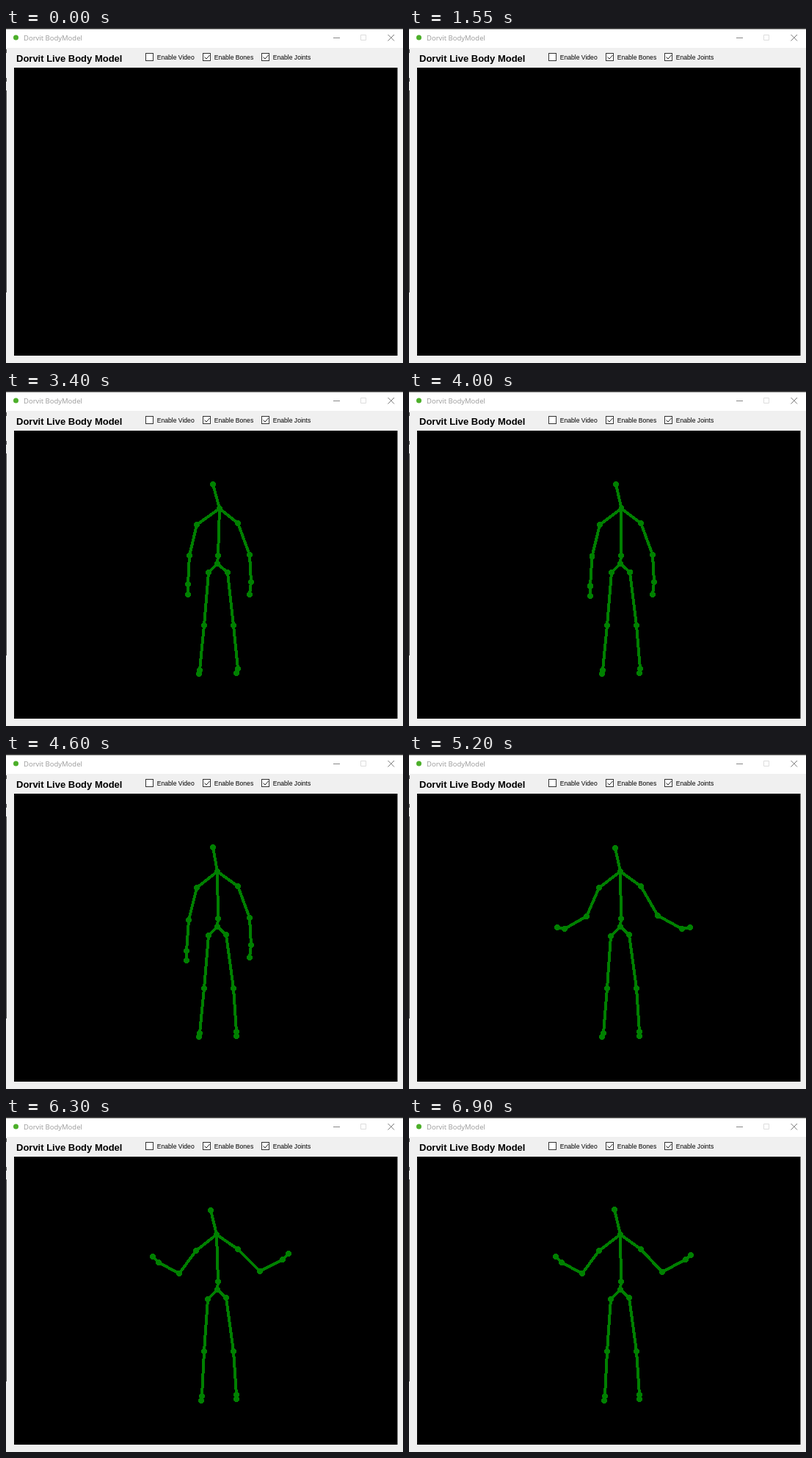
An HTML page for the animation above (6950 ms loop, 541 by 456 pixels).

```html
<!DOCTYPE html>
<html lang="en">
<head>
<meta charset="utf-8">
<title>Dorvit BodyModel</title>
<style>
  html, body { margin: 0; width: 100%; height: 100%; overflow: hidden; background: #f0f0f0; }
  svg { display: block; width: 541px; height: 456px; }
  .title { font: 9.5px "Open Sans", sans-serif; fill: #999; }
  .heading { font: bold 13px "Liberation Sans", Arial, sans-serif; }
  .label { font: 8.6px "Liberation Sans", Arial, sans-serif; }
  .box { fill: #fff; stroke: #333; }
  .line { fill: none; stroke: #222; }
  #body { fill: #008000; stroke: none; shape-rendering: crispEdges; }
  #body path { fill: none; stroke: #008000; stroke-width: 4; }
</style>
</head>
<body>
<svg viewBox="0 0 541 456">
  <rect width="541" height="456" fill="#f0f0f0"/>
  <rect width="541" height="27" fill="#fff"/>
  <rect width="541" height="1.5" fill="#2b2b2b"/>
  <path d="M.5 29v5M.5 68v5M.5 85V360" stroke="#555"/>
  <circle cx="13.5" cy="13" r="3.5" fill="#4caf2a"/>
  <text class="title" x="24" y="17">Dorvit BodyModel</text>
  <path class="line" d="M446 13.5h9" style="stroke:#888"/>
  <path class="line" d="M483.500 9.500h7v7h-7z" style="stroke:#ddd"/>
  <path class="line" d="M520.500 9l8.500 8.500M529 9l-8.500 8.500" style="stroke:#777"/>
  <text class="heading" x="14" y="45.500">Dorvit Live Body Model</text>
  <g id="options"></g>
  <rect x="11" y="54" width="522.500" height="392"/>
  <g id="body"></g>
</svg>
<script>
const LOOP = 6950, STEP = 50, APPEARS = 2500;

document.getElementById("options").innerHTML = [
  ["Enable Video", 190, false],
  ["Enable Bones", 268, true],
  ["Enable Joints", 348, true]
].map(([label, x, checked]) =>
  `<rect class="box" x="${x + .5}" y="34.500" width="10" height="10"/>` +
  (checked ? `<path class="line" d="M${x + 2.5} 39.500l2.500 2.500l4.500-5"/>` : "") +
  `<text class="label" x="${x + 15.7}" y="43.300">${label}</text>`
).join("");

const chains = [
  ["head", "neck", "spine", "hip"],
  ["neck", "shoulderL", "elbowL", "wristL", "handL"],
  ["neck", "shoulderR", "elbowR", "wristR", "handR"],
  ["hip", "hipL", "kneeL", "ankleL", "footL"],
  ["hip", "hipR", "kneeR", "ankleR", "footR"]
];

const entering = {
  head: [279, 130], neck: [283, 160], spine: [284, 223], hip: [285, 234],
  shoulderL: [254, 179], elbowL: [240, 223], wristL: [235, 263], handL: [236, 277],
  shoulderR: [310, 180], elbowR: [327, 223], wristR: [326, 258], handR: [325, 274],
  hipL: [272, 246], kneeL: [266, 316], ankleL: [266, 377], footL: [265, 383],
  hipR: [297, 246], kneeR: [307, 318], ankleR: [313, 376], footR: [312, 383]
};
const standing = {
  head: [282, 127], neck: [288, 160], spine: [289, 224], hip: [288, 235],
  shoulderL: [260, 182], elbowL: [249, 226], wristL: [246, 268], handL: [246, 281],
  shoulderR: [316, 180], elbowR: [332, 223], wristR: [334, 260], handR: [332, 277],
  hipL: [276, 247], kneeL: [270, 319], ankleL: [264, 380], footL: [263, 385],
  hipR: [300, 246], kneeR: [310, 319], ankleR: [314, 378], footR: [314, 384]
};
const leaning = {
  ...standing, neck: [291, 160], elbowL: [250, 224], wristL: [248, 263],
  handL: [248, 277], hipR: [302, 247], ankleR: [316, 378]
};
const lifting = {
  ...standing, head: [281, 128], shoulderL: [259, 182],
  elbowL: [242, 221], wristL: [212, 238], handL: [202, 236],
  elbowR: [339, 220], wristR: [372, 238], handR: [383, 236],
  hipL: [275, 248], ankleL: [265, 380]
};
const raised = {
  ...lifting, head: [279, 127], neck: [287, 160],
  elbowL: [236, 213], wristL: [208, 198], handL: [200, 190],
  elbowR: [346, 210], wristR: [377, 194], handR: [385, 186],
  ankleL: [267, 380], footL: [266, 386]
};
const reaching = {
  ...raised, wristL: [206, 217], handL: [194, 213],
  wristR: [381, 217], handR: [394, 214]
};
const settled = {
  ...raised, head: [280, 126], neck: [288, 160], elbowR: [345, 211], handR: [384, 188]
};

const keys = [
  [2800, entering], [3150, leaning], [3400, leaning], [4600, standing],
  [4950, standing], [5200, lifting], [5275, reaching], [5450, raised],
  [6300, raised], [6900, settled]
];
const names = Object.keys(standing);

function poseAt(t) {
  if (t <= keys[0][0]) return keys[0][1];
  const next = keys.findIndex(([time]) => time >= t);
  if (next < 0) return settled;
  const [t0, from] = keys[next - 1], [t1, to] = keys[next];
  const k = (t - t0) / (t1 - t0);
  return Object.fromEntries(names.map(name =>
    [name, from[name].map((v, i) => v + (to[name][i] - v) * k)]));
}

const body = document.getElementById("body");

function draw(t) {
  if (t < APPEARS) {
    body.innerHTML = "";
    return;
  }
  const pose = poseAt(t);
  const bones = chains.map(chain => "M" + chain.map(n => pose[n].join(" ")).join("L")).join("");
  const joints = names.map(n => `<circle cx="${pose[n][0]}" cy="${pose[n][1]}" r="4"/>`).join("");
  body.innerHTML = `<path d="${bones}"/>${joints}`;
}

const start = performance.now();
let shown = -1;

function tick() {
  const elapsed = (performance.now() - start) % LOOP;
  const t = Math.floor(elapsed / STEP) * STEP;
  if (t !== shown) draw(shown = t);
  requestAnimationFrame(tick);
}
tick();
</script>
</body>
</html>
```
